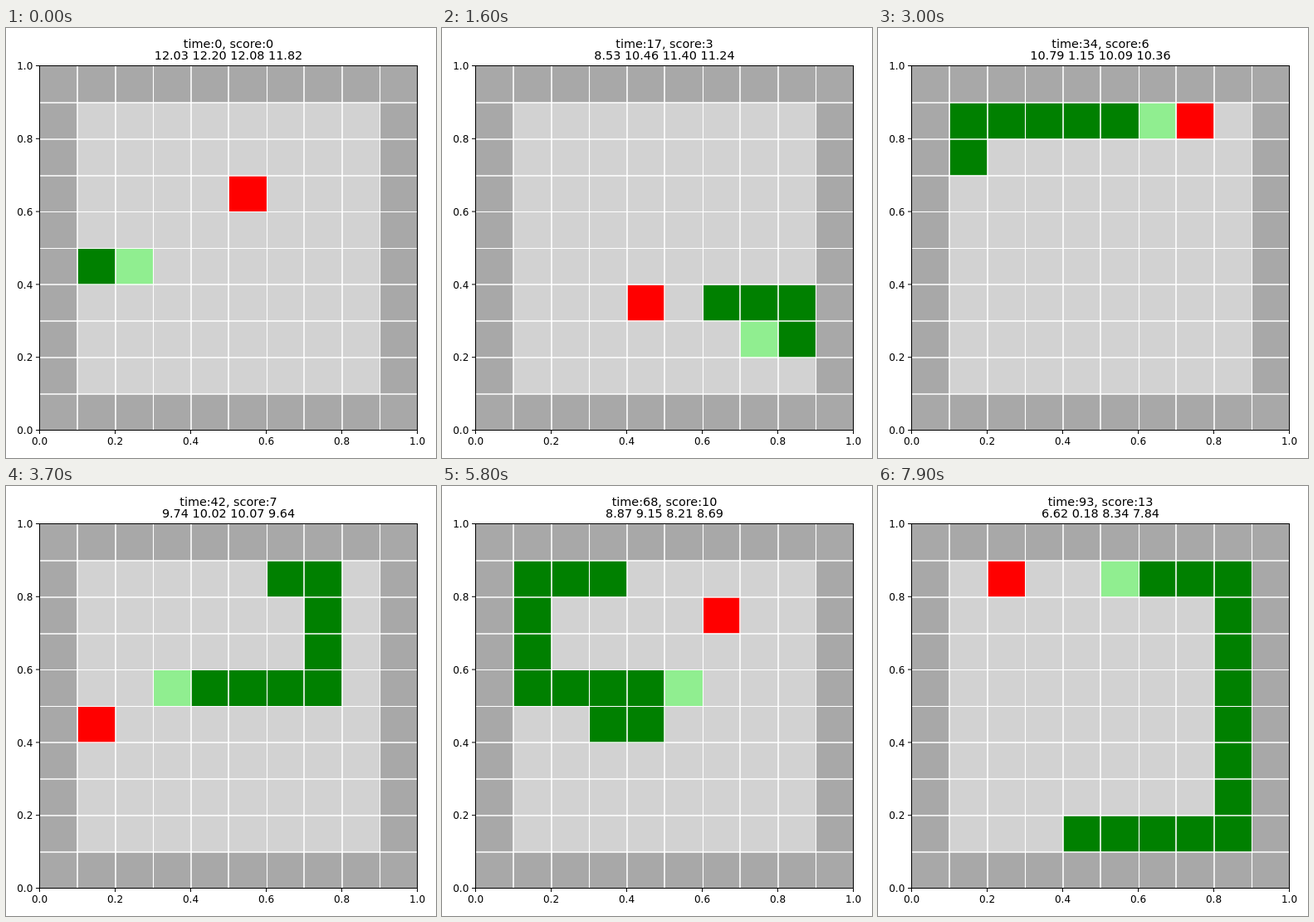
Animation of 518 by 518 pixels, one loop 8 s. Source, as an HTML page:

```html
<!DOCTYPE html>
<html lang="en">
<head>
<meta charset="utf-8">
<title>Snake agent</title>
<style>
  html, body { margin: 0; width: 100%; height: 100%; overflow: hidden; background: #fff; }
  svg { display: block; width: 100vw; height: 100vh; }
  text { font-family: "DejaVu Sans", sans-serif; font-size: 12px; fill: #000; }
  .title { font-size: 14.4px; text-anchor: middle; }
</style>
</head>
<body>
<svg id="stage" viewBox="0 0 518 518"></svg>
<script>
const LOOP = 8000, STEP = 100;
const LEFT = 41, TOP = 46, CELL_W = 45.5, CELL_H = 43.9, RIGHT = 496, BOTTOM = 485;
const stage = document.getElementById("stage");

function add(tag, attrs, content = "") {
  const node = document.createElementNS("http://www.w3.org/2000/svg", tag);
  for (const key in attrs) node.setAttribute(key, attrs[key]);
  node.textContent = content;
  return stage.appendChild(node);
}
const px = c => LEFT + c * CELL_W;
const py = r => TOP + r * CELL_H;
const line = (x1, y1, x2, y2, stroke, width) =>
  add("line", { x1, y1, x2, y2, stroke, "stroke-width": width });
const cellPath = ([c, r]) => `M${px(c)} ${py(r)}h${CELL_W}v${CELL_H}h${-CELL_W}z`;

// Moves are numbered like the action values: right, up, left, down.
const DIRS = [[1, 0], [0, -1], [-1, 0], [0, 1]];
const ROUTE = "U2 R3 D2 L2 D1 R5 D1 L4 U5 L3 U1 R6 D3 L6 D2 R1 D1 R1 U1 R1 U5 L3 " +
  "D3 R2 D1 R1 U1 R1 U2 R1 D4 L2 D2 R4 U7 L4";
const moves = ROUTE.split(" ").flatMap(run =>
  Array(+run.slice(1)).fill("RULD".indexOf(run[0])));
const START = [[1, 5], [2, 5]];
const trail = START.slice();
for (const m of moves) {
  const [c, r] = trail[trail.length - 1];
  trail.push([c + DIRS[m][0], r + DIRS[m][1]]);
}
const headAt = t => trail[t + 1];

const MEALS = [5, 9, 15, 21, 28, 34, 35, 45, 57, 62, 71, 76, 77];
const LAST_FOOD = [2, 1];

// time, then the value of each action away from walls
const VALUES = [
  [0, 12.03, 12.20, 12.08, 11.82],
  [17, 8.53, 10.46, 11.40, 11.24],
  [34, 10.79, 10.40, 10.09, 10.36],
  [52, 9.18, 9.55, 9.31, 8.75],
  [68, 8.87, 9.15, 8.21, 8.69],
  [76, 7.18, 7.19, 8.44, 7.86],
  [93, 6.62, 7.90, 8.34, 7.84]
];

function actionValues(t) {
  const i = Math.max(1, VALUES.findIndex(v => v[0] >= t));
  const a = VALUES[i - 1], b = VALUES[i];
  const k = (t - a[0]) / (b[0] - a[0]);
  const [c, r] = headAt(t);
  const values = DIRS.map(([dx, dy], d) => {
    const blocked = [c + dx, r + dy].some(n => n < 1 || n > 8);
    return blocked ? 1.15 - (t - 34) * 0.97 / 59 : a[d + 1] + (b[d + 1] - a[d + 1]) * k;
  });
  // The chosen move always carries the highest value.
  const best = values.indexOf(Math.max(...values)), move = moves[t];
  [values[best], values[move]] = [values[move], values[best]];
  return values.map(v => v.toFixed(2)).join(" ");
}

add("rect", { width: 518, height: 518, fill: "#fff" });
add("rect", { x: LEFT, y: TOP, width: RIGHT - LEFT, height: BOTTOM - TOP, fill: "#a8a8a8" });
add("rect", { x: px(1), y: py(1), width: 8 * CELL_W, height: 8 * CELL_H, fill: "#d2d2d2" });
const food = add("path", { fill: "#f00" });
const body = add("path", { fill: "#008000" });
const head = add("path", { fill: "#90ee90" });

for (let i = 1; i < 10; i++) {
  const thinX = [3, 6, 9].includes(i), thinY = [4, 5].includes(i);
  const x = thinX ? Math.floor(px(i)) + 0.5 : Math.round(px(i) - 0.1);
  const y = thinY ? Math.floor(py(i)) + 0.5 : Math.round(py(i));
  line(x, TOP, x, BOTTOM, "#fff", thinX ? 1.1 : 1.6);
  line(LEFT, y, RIGHT, y, "#fff", thinY ? 1 : 1.6);
}

add("rect", { x: 40.5, y: 45.5, width: 455, height: 439, fill: "none", stroke: "#000" });
for (let i = 0; i <= 10; i += 2) {
  const label = (i / 10).toFixed(1);
  const x = px(i) - 0.5, y = py(10 - i) - 0.5;
  line(x, BOTTOM, x, BOTTOM + 4, "#000", 1);
  line(LEFT - 5, y, LEFT - 1, y, "#000", 1);
  add("text", { x, y: 502, "text-anchor": "middle" }, label);
  add("text", { x: 32.3, y: y + 4.6, "text-anchor": "end" }, label);
}
const status = add("text", { class: "title", x: 268, y: 23.6 });
const scores = add("text", { class: "title", x: 268, y: 38.4 });

function render(ms) {
  const shot = Math.floor((ms % LOOP) / STEP);
  const t = Math.max(0, Math.round(shot * 1.2) - 2);
  const score = MEALS.filter(m => m <= t).length;
  const length = START.length + MEALS.filter(m => m < t).length;
  const nextMeal = MEALS.find(m => m > t);

  head.setAttribute("d", cellPath(headAt(t)));
  body.setAttribute("d", trail.slice(t + 2 - length, t + 1).map(cellPath).join(""));
  food.setAttribute("d", cellPath(nextMeal ? headAt(nextMeal) : LAST_FOOD));
  status.textContent = `time:${t}, score:${score}`;
  scores.textContent = actionValues(t);
}

const began = performance.now();
function tick() {
  render(performance.now() - began);
  requestAnimationFrame(tick);
}
tick();
</script>
</body>
</html>
```
